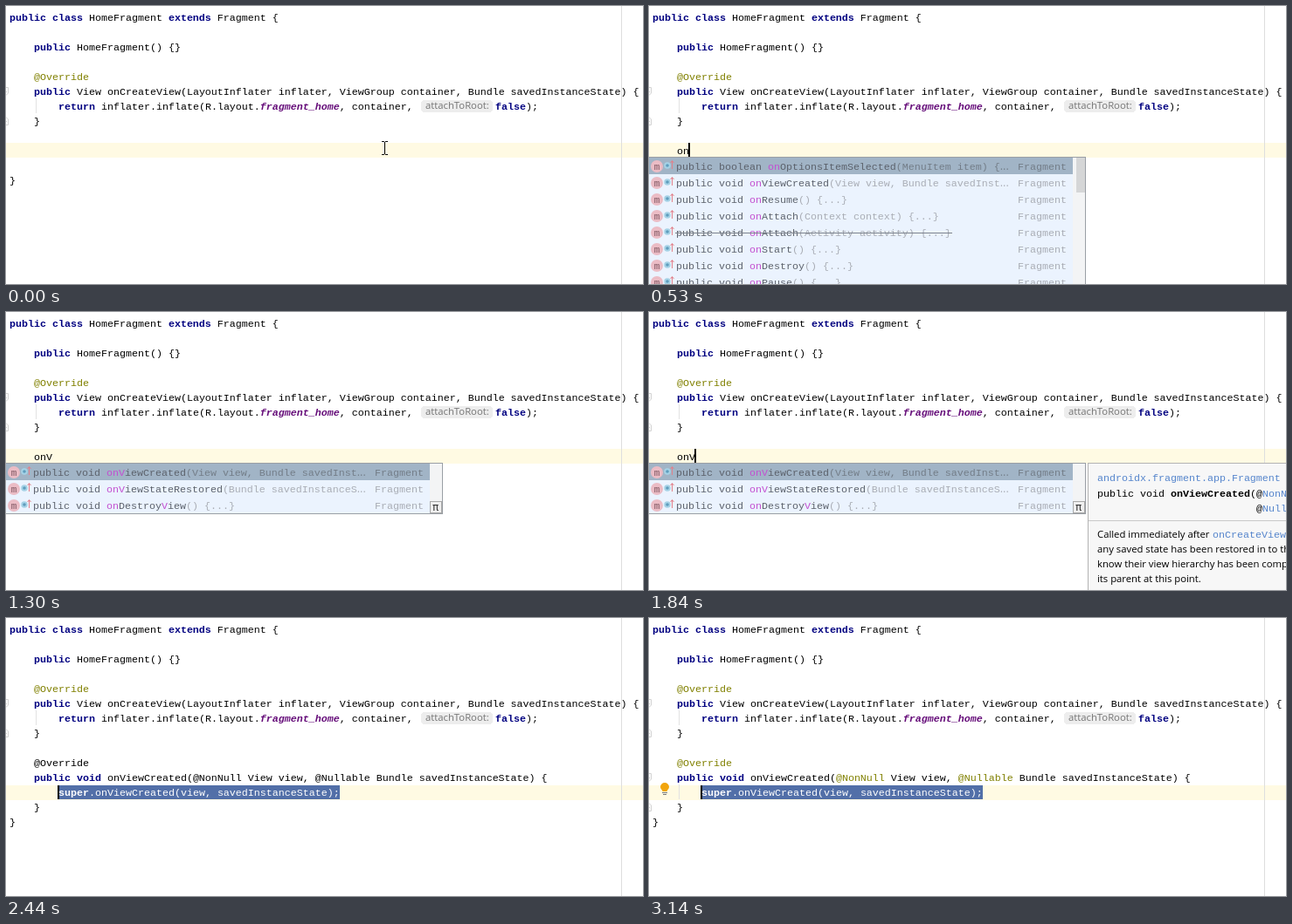
Write an HTML page that moves like this. It is 729 px wide and 319 px high and loops after 3200 ms.

```html
<!DOCTYPE html>
<html lang="en">
<head>
<meta charset="utf-8">
<title>Method completion</title>
<style>
html, body { margin: 0; width: 100%; height: 100%; overflow: hidden; background: #fff; }
svg { display: block; }
rect { shape-rendering: crispEdges; }
text { white-space: pre; font: 11.667px "Liberation Mono", monospace; fill: #000; }
.k { font-weight: bold; fill: #000080; }
.b { font-weight: bold; }
.a { fill: #808000; }
.f { font-weight: bold; font-style: italic; fill: #660e7a; }
.l { fill: #5585cc; }
.item { fill: #5c626c; }
.m { fill: #c24fd0; }
.p { fill: #a9adb5; }
.e { fill: #a9adb5; font: 12.5px "Open Sans", sans-serif; }
.selected .p, .selected .e { fill: #737d88; }
.prose { font: 11.3px "Open Sans", sans-serif; }
.hint { font: 11.3px "Open Sans", sans-serif; fill: #757575; }
.pi { font: 12px "DejaVu Sans", sans-serif; fill: #333; }
.picked, .picked .b { fill: #fff; }
</style>
</head>
<body>
<svg id="stage" width="729" height="319" viewBox="0 0 729 319"></svg>
<script>
const LOOP = 3200, COL = 7, ROW = 17, LEFT = 4;
const stage = document.getElementById('stage');
const layers = [];

function add(parent, tag, attrs = {}, content) {
  const el = document.createElementNS('http://www.w3.org/2000/svg', tag);
  for (const name in attrs) el.setAttribute(name, attrs[name]);
  if (content !== undefined) el.textContent = content;
  return parent.appendChild(el);
}
const group = (parent, attrs) => add(parent, 'g', attrs);
const box = (parent, x, y, width, height, fill, more) =>
  add(parent, 'rect', { x, y, width, height, fill, ...more });
const path = (parent, d, stroke, more) =>
  add(parent, 'path', { d, stroke, fill: 'none', ...more });

// Styled runs are written as ~<class letter>text~.
function label(parent, x, y, markup, cls = '') {
  const text = add(parent, 'text', { x, y, class: cls });
  markup.split('~').forEach((run, i) => {
    if (run) add(text, 'tspan', i % 2 ? { class: run[0] } : {}, i % 2 ? run.slice(1) : run);
  });
}
const code = (parent, row, col, markup, cls) =>
  label(parent, LEFT + col * COL, 17 + row * ROW, markup, cls);

function during(...spans) {
  const el = group(stage);
  layers.push({ el, spans });
  return el;
}

const band = (parent, y) => box(parent, 0, y, 729, 17, '#fffae3');
const caret = (parent, x, y) => box(parent, x, y, 2, 16, '#000');

function foldMarks(parent, top) {
  path(parent, `M0 ${top - 4.5}H2.5V${top + 2}L0 ${top + 4.5}M0 ${top + 0.5}H1`, '#d2d2d2');
  const end = top + 2 * ROW;
  path(parent, `M0 ${end - 4.5}L2.5 ${end - 2}V${end + 4.5}H0M0 ${end + 0.5}H1`, '#d2d2d2');
  box(parent, 34, top + 8, 1, ROW, '#e2e2e2');
}

function overrideIcon(parent, y) {
  add(parent, 'circle', { cx: 9, cy: y, r: 7, fill: '#ebbcc5' });
  add(parent, 'text', { x: 9, y: y + 3.5, 'text-anchor': 'middle', style: 'font-size:11px;fill:#7d5560' }, 'm');
  add(parent, 'circle', { cx: 21, cy: y - 1, r: 2.8, fill: '#5f9dbd', stroke: '#a5d2e6', 'stroke-width': 2 });
  path(parent, `M26.5 ${y + 3}V${y - 6}M24.5 ${y - 4}L26.5 ${y - 6.5}L28.5 ${y - 4}`, '#e2808a');
}

function completion(parent, items, height) {
  box(parent, 0, 173, 500, height, '#9a9fa5');
  box(parent, 0, 174, 485, height - 2, '#ebf3fe');
  box(parent, 485, 174, 14, height - 2, '#f3f4f5');
  items.forEach((markup, i) => {
    const y = 184 + i * 19;
    const row = group(parent, i ? {} : { class: 'selected' });
    if (!i) box(row, 0, 174, 485, 19, '#a1b4c6');
    overrideIcon(row, y);
    label(row, 31, y + 4, 'public ' + markup, 'item');
    label(row, 422, y + 4, '~pFragment~', 'item');
  });
}

// Editor surface
band(during([0, 2440]), 157);
band(during([2440, LOOP]), 192);
box(stage, 704, 0, 1, 319, '#dedede');

code(stage, 0, 0, '~kpublic class~ HomeFragment ~kextends~ Fragment {');
code(stage, 2, 4, '~kpublic~ HomeFragment() {}');
code(stage, 4, 4, '~a@Override~');
code(stage, 5, 4, '~kpublic~ View onCreateView(LayoutInflater inflater, ViewGroup container, Bundle savedInstanceState) {');
code(stage, 6, 8, '~kreturn~ inflater.inflate(R.layout.~ffragment_home~, container, ');
box(stage, 475, 108, 82, 14, '#ededed', { rx: 4 });
label(stage, 480, 118, 'attachToRoot:', 'hint');
label(stage, 560, 119, '~kfalse~);');
code(stage, 7, 4, '}');
foldMarks(stage, 98);

code(during([0, 2440]), 11, 0, '}');

const pointer = during([0, 310]);
path(pointer, 'M430 155.5H433M434 155.5H437M433.5 156V170M430 170.5H433M434 170.5H437', '#000');

// Typing
[['o', 310, 390], ['on', 390, 690], ['onV', 690, 2440]].forEach(([typed, from, to]) => {
  code(during([from, to]), 9, 4, typed);
  const blink = typed === 'onV' ? [[from, 1300], [1760, to]] : [[from, to]];
  caret(during(...blink), 31 + typed.length * COL, 157);
});

// Completion lists
const wide = during([530, 690]);
completion(wide, [
  'boolean ~mon~OptionsItemSelected~p(MenuItem item) {~~e...~',
  'void ~mon~ViewCreated~p(View view, Bundle savedInst~~e...~',
  'void ~mon~Resume~p() {...}~',
  'void ~mon~Attach~p(Context context) {...}~',
  'void ~mon~Attach~p(Activity activity) {...}~',
  'void ~mon~Start~p() {...}~',
  'void ~mon~Destroy~p() {...}~',
  'void ~mon~Pause~p() {...}~'
], 160);
box(wide, 30, 260, 317, 1, '#7d838c');
box(wide, 489, 174, 10, 40, '#d5d6d7');

const narrow = during([690, 2300]);
completion(narrow, [
  'void ~monV~iewCreated~p(View view, Bundle savedInst~~e...~',
  'void ~monV~iewStateRestored~p(Bundle savedInstanceS~~e...~',
  'void ~mon~Destroy~mV~iew~p() {...}~'
], 59);
box(narrow, 485, 217, 14, 14, '#a8a8a8');
box(narrow, 486, 218, 12, 12, '#f0f0f0');
label(narrow, 488, 228, 'π', 'pi');

// Documentation
const doc = during([1840, 2300]);
box(doc, 502, 173, 227, 146, '#b3b3b3');
box(doc, 503, 174, 226, 145, '#f7f7f7');
label(doc, 513, 194, '~landroidx.fragment.app.Fragment~');
label(doc, 513, 212, 'public void ~bonViewCreated~(@~lNonNull~');
label(doc, 695, 229, '@~lNullable~');
box(doc, 503, 239, 226, 1, '#c9c9c9');
[
  'Called immediately after',
  'any saved state has been restored in to the',
  'know their view hierarchy has been completely',
  'its parent at this point.'
].forEach((line, i) => label(doc, 513, 259 + i * ROW, line, 'prose'));
label(doc, 645, 259, '~lonCreateView~');

// Generated method
function signature(parent, mark) {
  const note = name => mark ? `~a${name}~` : name;
  code(parent, 9, 4, note('@Override'));
  code(parent, 10, 4, `~kpublic void~ onViewCreated(${note('@NonNull')} View view, ${note('@Nullable')} Bundle savedInstanceState) {`);
}
signature(during([2440, 2600]), false);
const analysed = during([2600, LOOP]);
signature(analysed, true);
foldMarks(analysed, 183);

const body = during([2440, LOOP]);
box(body, 60, 192, 322, 16, '#526fa8');
caret(body, 59, 192);
code(body, 11, 8, '~bsuper~.onViewCreated(view, savedInstanceState);', 'picked');
code(body, 12, 4, '}');
code(body, 13, 0, '}');

const bulb = during([3140, LOOP]);
add(bulb, 'path', { d: 'M15.5 199C15.5 197 13 196.5 13 194A5 5 0 0 1 23 194C23 196.5 20.5 197 20.5 199Z', fill: '#f2a50c' });
box(bulb, 15, 200, 6, 1, '#777');
box(bulb, 16, 202, 4, 1, '#777');

function render(time) {
  const t = time % LOOP;
  for (const { el, spans } of layers) {
    const shown = spans.some(([from, to]) => t >= from && t < to);
    el.setAttribute('display', shown ? 'inline' : 'none');
  }
}

const start = performance.now();
function tick() {
  render(performance.now() - start);
  requestAnimationFrame(tick);
}
tick();
</script>
</body>
</html>
```
